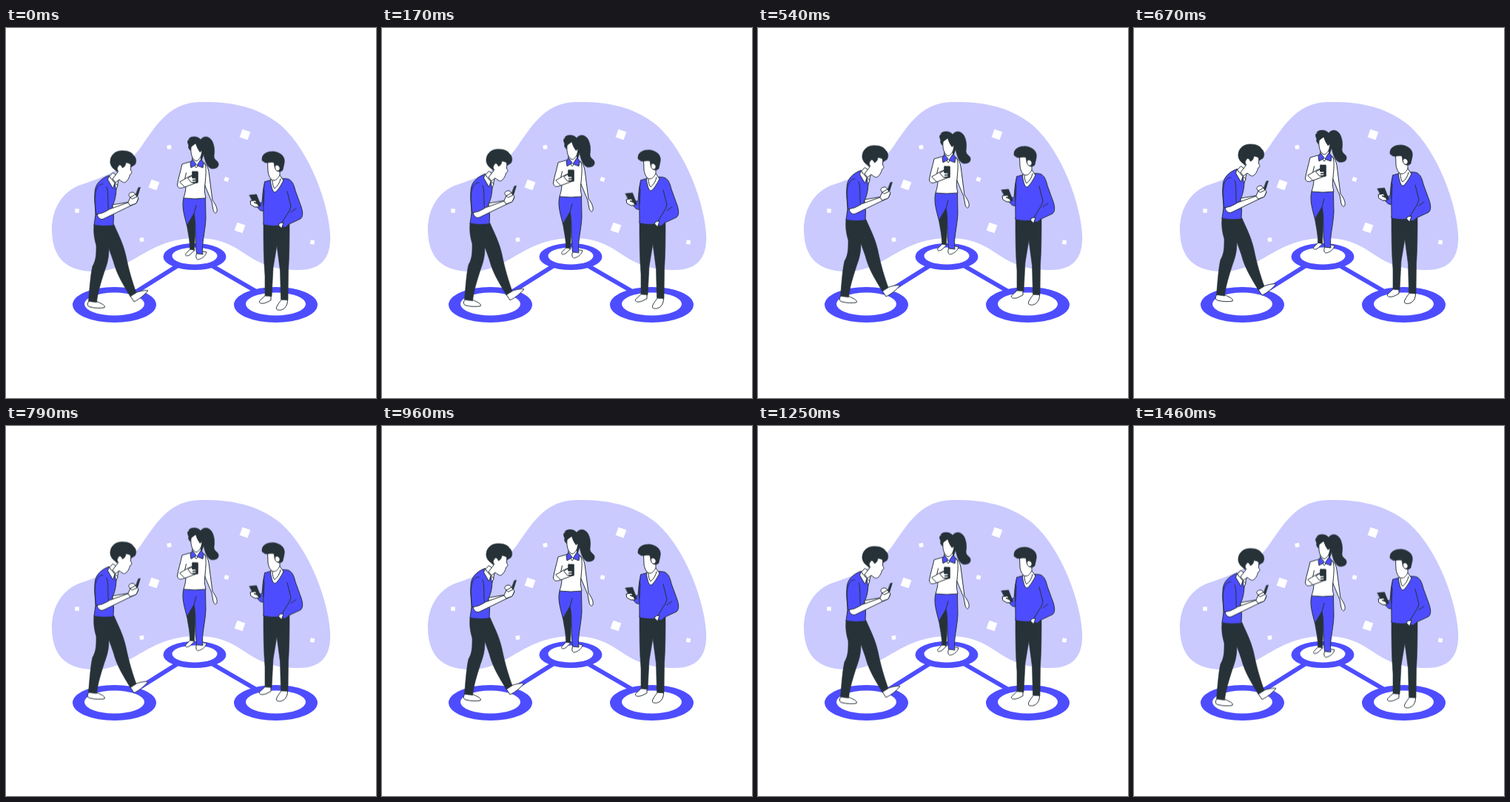
These frames come from a looping animation (500 by 500 pixels, 1.5 s). An HTML page:

```html
<!DOCTYPE html>
<html lang="en">
<head>
<meta charset="utf-8">
<title>Connected people</title>
<style>
  html, body { margin: 0; width: 100%; height: 100%; overflow: hidden; background: #fff; }
  svg { display: block; width: 100%; height: 100%; }
  .blob { fill: #cacaff; }
  .ring { fill: #4d4dff; }
  .white { fill: #fff; }
  .link { stroke: #4d4dff; stroke-width: 6; }
  #people { stroke: #263238; stroke-width: 1; stroke-linecap: round; stroke-linejoin: round; }
  .dark { fill: #263238; stroke-width: .6; }
  .blue { fill: #4d4dff; }
  .skin { fill: #fff; }
  .line { fill: none; }
</style>
</head>
<body>
<svg viewBox="0 0 500 500">
  <path class="blob" d="M262 100C222 101 205 128 183 160C160 193 130 202 98 213C72 224 61 250 62 275C63 305 76 329 120 329C172 329 190 284 258 284C325 284 320 327 396 327C428 327 440 308 438 278C436 240 412 168 372 132C340 105 300 99 262 100Z"/>
  <g id="squares" class="white"></g>
  <path class="link" d="M175 357L234 320M276 320L340 357"/>
  <g id="rings"></g>

  <g id="people">
    <!-- woman -->
    <g>
      <path class="dark" d="M256 157C251 150 247 150 245.500 153C245 157 248 158 246.500 161C247 164 250 167 252 167L264 180L267 171C269 180 271 187 277 190C284 191 288 188 287 183C286 179 281 179 281 173C283 163 280 152 275 149C271 146 266 147 263 151C259 146 250 146 247 150Z"/>
      <path class="dark" d="M244.500 267L255 248L256 264L254.500 301H248.500C249 288 246 278 244.500 267Z"/>
      <path class="skin" d="M248.500 299.500L243.500 304.500C241 308 244 309 248 307L255 300.500Z"/>
      <path class="skin" d="M258 304C256 308 256.500 313 259.500 313C265 312 270 308 271 303L266.500 302Z"/>
      <path class="blue" d="M240 230C237 241 241 254 244.500 267L254 251C257 264 255 283 257.500 305L266 306C264 292 269 277 270 258L269.500 230Z"/>
      <path class="line" d="M254 251L257 240"/>
      <path class="skin" d="M265 181C272 183 274 191 275 202L279 233C283 238 286 244 285 248C284 252 281 250 280 246L278 235L268 211Z"/>
      <path class="skin" d="M252 180L238 184C236 194 233 202 231.500 212C232 217 236 218 243 214C243 221 241 226 240 230Q255 232 270 230C268 222 268 217 269 211C270 199 271 191 269 184L263 180Z"/>
      <path class="line" d="M241 207L243.500 196M243 214L250 211"/>
      <path class="skin" d="M252 174L251.500 182L257 189L265 181L263 174Z"/>
      <path class="blue" d="M252 178L249 182.500L250 189L257 185ZM263.500 177.500L258 186L266 189L267 183Z"/>
      <path class="skin" d="M250 161C249 171 252 178 257 180C261 179 264 174 264.500 169C266 166 263 165 262.500 168C260 165 258 161 256.500 156Z"/>
      <path class="skin" d="M235 208L247 201L252 199L258 205V209L250 212L242 215Z"/>
      <rect class="dark" x="251.500" y="194" width="8" height="15.500" rx="1"/>
      <path class="skin" d="M246 203L251 200L252 203H257V205L252 206H257V208L251 209Z"/>
    </g>

    <!-- man on the left -->
    <g>
      <path class="skin" d="M112 369.500C109 373 110 376 113 377C120 379 128 379 133 378C135 375 129 372.500 122 369.500Z"/>
      <path class="skin" d="M168 362.500L173 370C180 367 188 360 192 355C187 354 181 356 176 357.500Z"/>
      <path class="dark" d="M119 266H146C150 276 158 290 162 308C166 328 171 344 176 358L168 363C158 346 150 334 145 315L139 298C139 311 137 318 133 329C128 345 124 357 122.500 371L111.500 369.500C113 353 114 335 117 322C122 314 122 305 122 294C119 284 118 275 119 266Z"/>
      <path class="skin" d="M144 239L165 235.500L169 238L146 249Z"/>
      <path class="blue" d="M139 199.500C127 204 120 212 120 223C119 235 121 243 121 252L119 266.500Q132 269 145 267L145.500 254L143 242C147 235 149 226 149 215L143 203Z"/>
      <path class="skin" d="M144 196L139.500 201L146 210L150 215L153 202Z"/>
      <path class="skin" d="M139 200.500L137.500 205L144.500 217L147 210ZM147 210L148.500 219L151 213Z"/>
      <path class="skin" d="M151 188C147 190 148 194 151 195L144 204L148 209L153 205C157 208 160 211 163 207C167 203 167 199 168 197.500C170 197 171 196 168.500 192L169 182L156 178Z"/>
      <path class="dark" d="M151 194C144 191 140 185 141 179C142 170 150 165.500 158 166C165 166 171 169 172 172C176 175 177 181 174 185L169 188C170 183 165 183 162 182C162 185 160 189 157 189C156 184 151 184 150.500 189C150 191 151 193 152 194Z"/>
      <path class="skin" d="M123 250C123 256 127 260 132 258L165 242L176 237L179 231L171 229L165 236L137 246Z"/>
      <path class="blue" d="M131 211C122 211 119.500 224 120.500 236L121.500 252Q131 251 138.500 246C137 234 139 221 136 215"/>
      <path class="skin" d="M165 235.500L168 229C164 226 166 222 172 222L177 227L179 230L176 237L168 240Z"/>
      <path class="dark" d="M179 216L181.500 215.500L178 227L174 229Z"/>
      <path class="skin" d="M168 229L175 225L177 228L171 231Z"/>
    </g>

    <!-- man on the right -->
    <g>
      <path class="skin" d="M350 362L342.500 369C341 373 348 373 352 371L358 368V362Z"/>
      <path class="skin" d="M372 367.500C367 374 363 380 367 381C373 383 381 378 380.500 367.500Z"/>
      <path class="dark" d="M348 264H383C383 284 383 307 381.500 328L381 368L371.500 367L370.500 328L366 294L361 324L359 363L350 362L350 335C348 311 348 288 348 264Z"/>
      <path class="skin" d="M331 234L336 232L343 236L345 245L339 242L332 239Z"/>
      <path class="blue" d="M350 208C347 217 347 226 346 236L341.500 236.500L339 241C342 247 346 249 350 246L354 226Z"/>
      <path class="blue" d="M358 205.500L349.500 208C347 224 348 244 348 266Q361 269 371 267L377 270L383 265L398 258C402 255 401 248 399 242L391 220C389 211 386 205 380 204L373 203.500Z"/>
      <path class="line" d="M380 221L385 241L383 247L373 263M385 249L392 244M349 220L348 240"/>
      <path class="skin" d="M359 201L357.500 208C359 217 361 223 364 222C368 219 372 212 375 206L370 199Z"/>
      <path class="line" d="M360 206C360 211 361 215 363 217C367 214 370 209 371 204"/>
      <path class="skin" d="M353.500 181L354 194C355 201 358 206 362 206C366 206 368 202 370 199L370 184L361 180Z"/>
      <path class="dark" d="M346 179C345 170 353 167 361 167C371 168 378 174 376 183L374 192C372 195 367 195 365 192L363 188L362 182C357 181 353 183 350 182Z"/>
      <path class="skin" d="M363.500 187C366 183 371 187 370 191C369 194 365 194 364 191Z"/>
      <path class="dark" d="M329 226L338.500 225L344.500 240.500L337 242Z"/>
      <path class="skin" d="M330.500 234L337 233L339 236L335 236L340 238L342 242L336 242L331 239Z"/>
      <path class="skin" d="M370 264L375 263L372.500 271L368.500 267Z"/>
    </g>
  </g>
</svg>
<script>
const NS = 'http://www.w3.org/2000/svg';

function add(parent, tag, attrs) {
  const el = document.createElementNS(NS, tag);
  for (const key in attrs) el.setAttribute(key, attrs[key]);
  parent.append(el);
}

// centre x, centre y, side, angle
const squares = [
  [323, 144, 11.5, 20], [200, 212, 11.5, 20], [316, 270, 11.5, 20], [220.5, 161, 5.5, -12],
  [298, 204.5, 5.5, 18], [96, 247, 5.5, 4], [183.5, 286, 5.5, -14], [414, 289.5, 5.5, 6]
];
for (const [x, y, s, a] of squares) {
  add(document.getElementById('squares'), 'rect', {
    x: x - s / 2, y: y - s / 2, width: s, height: s, transform: `rotate(${a} ${x} ${y})`
  });
}

// centre x, centre y, outer radii, inner radii
const rings = [
  [146.5, 374, 56.5, 24, 40.5, 15.5],
  [364.5, 374, 56.5, 24, 40.5, 15.5],
  [255, 309, 42.5, 18, 30.5, 11.5]
];
for (const [cx, cy, rx, ry, ix, iy] of rings) {
  const group = document.getElementById('rings');
  add(group, 'ellipse', { cx, cy, rx, ry, class: 'ring' });
  add(group, 'ellipse', { cx, cy: cy - 1, rx: ix, ry: iy, class: 'white' });
}

// the group floats up and back at constant speed
document.getElementById('people').animate(
  [0, -10, 0].map(y => ({ transform: `translateY(${y}px)` })),
  { duration: 1500, iterations: Infinity, easing: 'linear' }
);
</script>
</body>
</html>
```
